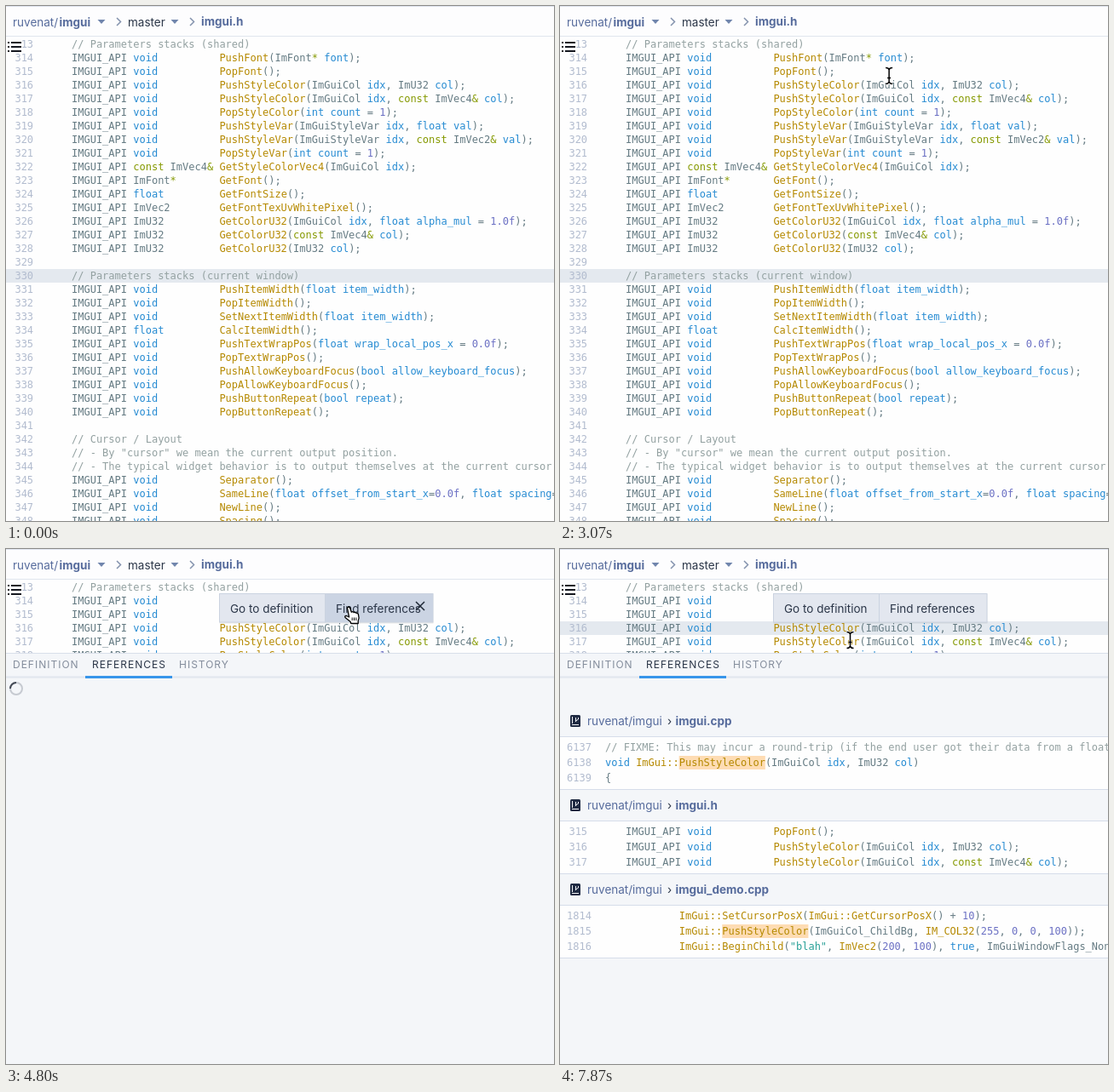
Animation, 643 px wide and 605 px high, one loop 8 s. Source, as an HTML page:

```html
<!DOCTYPE html>
<html lang="en">
<head>
<meta charset="utf-8">
<title>Find references</title>
<style>
html, body { margin: 0; width: 100%; height: 100%; overflow: hidden; background: #fefefe; }
svg { display: block; }
text { white-space: pre; font: 13.5px Inter, "Open Sans", sans-serif; }
.code { font: 12px "DejaVu Sans Mono", "Noto Sans Mono", monospace; fill: #657b83; }
.num { fill: #b2bccf; text-anchor: end; }
.comment { fill: #93a1a1; }
.string { fill: #2aa198; }
.number { fill: #6c71c4; }
.operator { fill: #859900; }
.call { fill: #b58900; }
.name { fill: #268bd2; }
.link { fill: #566b9c; }
.bold { font-weight: 700; }
.tab { font-size: 12px; letter-spacing: 1px; fill: #848d9c; }
.dark { fill: #2b3648; }
</style>
</head>
<body>
<svg id="stage" width="643" height="605" viewBox="0 0 643 605"></svg>
<script>
const LOOP = 8000;
const CHAR = 7.224;
const OWNER = 'ruvenat';
const stage = document.getElementById('stage');

const escapeText = s => s.replace(/&/g, '&amp;').replace(/</g, '&lt;');
const rect = (x, y, w, h, fill, extra = '') =>
  `<rect x="${x}" y="${y}" width="${w}" height="${h}" fill="${fill}" ${extra}/>`;
const path = (d, stroke, width, extra = '') =>
  `<path d="${d}" fill="none" stroke="${stroke}" stroke-width="${width}" ${extra}/>`;
const label = (x, y, cls, s) => `<text x="${x}" y="${y}" class="${cls}">${escapeText(s)}</text>`;

const kinds = ['comment', 'string', 'number', 'operator', 'call', 'name'];
const tokens = /(\/\/.*)|("[^"]*")|(\b\d[\d.]*f?\b)|(\bconst\b|[*&])|(ImGui::|\w+(?=\())|(\b[a-z]\w*)|\w+|[^\w*&"\/]+|./g;

function highlight(source) {
  return source.replace(tokens, (token, ...groups) => {
    const kind = kinds.find((_, i) => groups[i] !== undefined);
    const safe = escapeText(token);
    return kind ? `<tspan class="${kind}">${safe}</tspan>` : safe;
  });
}

// Line number plus highlighted source; wider numbers push the code right.
function codeLine(number, y, source) {
  const wide = number > 999;
  const indent = source.search(/\S|$/);
  const x = (wide ? 53 : 48.1) + indent * CHAR;
  return `<text x="${wide ? 37 : 32.1}" y="${y}" class="code num">${number}</text>` +
    `<text x="${x}" y="${y}" class="code">${highlight(source.slice(indent))}</text>`;
}

const api = (result, call) => `    IMGUI_API ${result.padEnd(14)}${call}`;

const listing = `// Parameters stacks (shared)
void|PushFont(ImFont* font);
void|PopFont();
void|PushStyleColor(ImGuiCol idx, ImU32 col);
void|PushStyleColor(ImGuiCol idx, const ImVec4& col);
void|PopStyleColor(int count = 1);
void|PushStyleVar(ImGuiStyleVar idx, float val);
void|PushStyleVar(ImGuiStyleVar idx, const ImVec2& val);
void|PopStyleVar(int count = 1);
const ImVec4&|GetStyleColorVec4(ImGuiCol idx);
ImFont*|GetFont();
float|GetFontSize();
ImVec2|GetFontTexUvWhitePixel();
ImU32|GetColorU32(ImGuiCol idx, float alpha_mul = 1.0f);
ImU32|GetColorU32(const ImVec4& col);
ImU32|GetColorU32(ImU32 col);

// Parameters stacks (current window)
void|PushItemWidth(float item_width);
void|PopItemWidth();
void|SetNextItemWidth(float item_width);
float|CalcItemWidth();
void|PushTextWrapPos(float wrap_local_pos_x = 0.0f);
void|PopTextWrapPos();
void|PushAllowKeyboardFocus(bool allow_keyboard_focus);
void|PopAllowKeyboardFocus();
void|PushButtonRepeat(bool repeat);
void|PopButtonRepeat();

// Cursor / Layout
// - By "cursor" we mean the current output position.
// - The typical widget behavior is to output themselves at the current cursor position.
void|Separator();
void|SameLine(float offset_from_start_x=0.0f, float spacing=-1.0f);
void|NewLine();
void|Spacing();`.split('\n').map(line =>
  line.includes('|') ? api(...line.split('|')) : '    ' + line);

const listingMarkup = listing.map((s, i) => codeLine(313 + i, 49 + 16 * i, s)).join('');

const caret = x => `<path d="M${x - 4.5} 16h9l-4.5 5z" fill="#7186ad"/>`;
const chevron = x => path(`M${x - 2} 14l4.5 4.5l-4.5 4.5`, '#8493ad', 1.5);

const header = rect(0, 0, 643, 35, '#fdfdfe') +
  rect(0, 0, 643, 1, '#dfe4ee') + rect(0, 35, 643, 1, '#e0e5ee') +
  label(8, 24, 'link', OWNER + '/') + label(62.5, 24, 'link bold', 'imgui') + caret(112) +
  chevron(132) + label(143, 24, 'dark', 'master') + caret(198) +
  chevron(218) + label(229, 23, 'link bold', 'imgui.h') +
  rect(0, 37, 18, 19, '#fefefe') +
  [43, 48, 53].map(y => rect(2, y - 1, 2, 2, '#14171f') + rect(6, y - 1, 12, 2, '#14171f')).join('');

const tabs = rect(0, 122, 643, 483, '#f4f6f9') + rect(0, 122, 643, 1, '#d9dfea') +
  rect(0, 149.5, 643, 2, '#e1e6ee') + rect(93, 149, 102, 3, '#3795ea') +
  label(8, 140, 'tab', 'DEFINITION') + label(101, 140, 'tab dark', 'REFERENCES') +
  label(203, 140, 'tab', 'HISTORY');

function resultBlock(top, file, first, sources) {
  const icon = rect(12, top - 25, 12, 14, '#1f2a42', 'rx="1.5"') +
    rect(14, top - 23, 1, 8, '#f4f6f9') +
    path(`M18.5 ${top - 22}v5M18.5 ${top - 18}l3 -2v-2M14 ${top - 13.5}h8`, '#f4f6f9', 1);
  return icon + label(32, top - 13, 'link', OWNER + '/imgui') +
    label(126, top - 13, 'dark', '›') + label(135.5, top - 13, 'link bold', file) +
    rect(0, top, 643, 63, '#fefefe') +
    rect(0, top, 643, 1, '#d6ddea') + rect(0, top + 62, 643, 1, '#d6ddea') +
    sources.map((s, i) => {
      const y = top + 17 + 18 * i;
      const at = s.indexOf('ImGui::PushStyleColor');
      const mark = at < 0 ? '' : rect(53 + (at + 7) * CHAR, y - 12, 14 * CHAR, 16, '#fedcb3');
      return mark + codeLine(first + i, y, s);
    }).join('');
}

const results =
  resultBlock(220, 'imgui.cpp', 6137, [
    '// FIXME: This may incur a round-trip (if the end user got their data from a float[4])',
    'void ImGui::PushStyleColor(ImGuiCol idx, ImU32 col)',
    '{']) +
  resultBlock(319, 'imgui.h', 315, listing.slice(2, 5)) +
  resultBlock(418, 'imgui_demo.cpp', 1814, [
    'ImGui::SetCursorPosX(ImGui::GetCursorPosX() + 10);',
    'ImGui::PushStyleColor(ImGuiCol_ChildBg, IM_COL32(255, 0, 0, 100));',
    'ImGui::BeginChild("blah", ImVec2(200, 100), true, ImGuiWindowFlags_None);'
  ].map(s => ' '.repeat(12) + s));

const beam = 'M-4 -9.5Q-.5 -9.5 0 -7Q.5 -9.5 4 -9.5M0 -7.5V7.5M-4 9.5Q-.5 9.5 0 7Q.5 9.5 4 9.5M-2 2.5H2';
const cursors = {
  arrow: '<path d="M0 0V16.5L3.8 13L6.4 19L9.2 17.8L6.7 12H11.5z" fill="#000" stroke="#fff" stroke-width="1"/>',
  beam: path(beam, '#fff', 3) + path(beam, '#000', 1.5),
  hand: '<path d="M-1.6 1.2Q-.2 -1 1.4 .8L3.4 6.2Q5 5 6.2 6.6Q7.9 5.6 8.8 7.3Q10.8 6.6 11.4 8.8' +
    'Q12.8 13 11.2 16.5L11.2 19.5H2.8L2.2 17.5L-4 12.5Q-5 10.3 -2.5 10.5L.6 12z" ' +
    'fill="#fff" stroke="#000" stroke-width="1.3" stroke-linejoin="round"/>' +
    path('M4.2 12.5V16M6.5 12.5V16M8.8 12.5V16', '#000', 1)
};

stage.innerHTML = `
  ${rect(0, 0, 643, 605, '#fefefe')}
  <rect id="row" width="643" height="16" fill="#e4e9ef"/>
  ${listingMarkup}${header}
  <g id="panel">${tabs}
    <g id="spinner"><circle r="7" fill="none" stroke="#c6cad1" stroke-width="2"/>
      ${path('M-7 0A7 7 0 0 1 0 -7', '#454b57', 2)}</g>
    <g id="results">${results}</g>
  </g>
  <g id="popup">
    ${rect(250.5, 53, 251, 34.5, '#000', 'opacity=".08"')}
    <rect id="goButton" x="250.5" y="52.5" width="124" height="33.5" stroke="#cbd3e0"/>
    <rect id="findButton" x="374.5" y="52.5" width="126.5" height="33.5"/>
    ${label(263, 75, 'dark', 'Go to definition')}${label(387, 75, 'dark', 'Find references')}
    <g id="close">${path('M481 62l10 10M491 62l-10 10', '#1f2937', 1.5)}</g>
  </g>
  <g id="cursor">${Object.entries(cursors).map(([k, m]) => `<g id="${k}">${m}</g>`).join('')}</g>`;

const el = id => document.getElementById(id);
const show = (id, on) => el(id).setAttribute('visibility', on ? 'inherit' : 'hidden');
const set = (id, name, value) => el(id).setAttribute(name, value);

// Pointer stops: time, x, y.
const stops = [
  [733, 652, 76], [800, 638, 80], [1000, 598, 90], [1200, 583, 100], [1600, 591, 105],
  [1667, 592, 106], [1900, 610, 113], [2130, 619, 104], [2270, 612, 97], [2400, 608, 106],
  [2467, 608, 109], [2533, 608, 109], [2800, 540, 100], [3000, 420, 84], [3130, 365, 81],
  [3400, 340, 92], [3933, 340, 92], [4200, 365, 80], [4467, 402, 68], [5900, 402, 68],
  [6330, 335, 340], [6600, 300, 498], [6733, 301, 484], [7000, 322, 317], [7330, 336, 160],
  [7600, 340, 113], [7733, 340.5, 107], [8000, 340.5, 107]
];

function slope(i, axis) {
  if (i < 1 || i > stops.length - 2) return 0;
  const rate = k => (stops[k + 1][axis] - stops[k][axis]) / (stops[k + 1][0] - stops[k][0]);
  const a = rate(i - 1), b = rate(i);
  return a * b > 0 ? 2 * a * b / (a + b) : 0;
}

// Monotone cubic through the stops, so holds stay still.
function pointerAt(t) {
  if (t < 760) return t > 260 && t < 330 ? [635, 543] : [700, 543];
  const i = Math.max(0, stops.findIndex(s => s[0] > t) - 1);
  const span = stops[i + 1][0] - stops[i][0];
  const u = (t - stops[i][0]) / span;
  return [1, 2].map(axis => {
    const p = stops[i][axis], q = stops[i + 1][axis];
    return p + (q - p) * u * u * (3 - 2 * u) +
      span * u * (1 - u) * (slope(i, axis) * (1 - u) - slope(i + 1, axis) * u);
  });
}

function pointerKind(t, x, y) {
  if (t < 3900) return x < 600 ? 'beam' : 'arrow';
  if (y > 480) return 'arrow';
  return y > 86 && y < 122 ? 'beam' : 'hand';
}

function render(time) {
  const t = Math.floor((time + 4) * 15 / 1000) * 1000 / 15;
  const [x, y] = pointerAt(t);
  const kind = pointerKind(t, x, y);
  set('cursor', 'transform', `translate(${x.toFixed(2)} ${y.toFixed(2)})`);
  Object.keys(cursors).forEach(k => show(k, k === kind));

  const opacity = t < 3460 ? 0 : t < 3530 ? 0.45 : t < 3595 ? 0.86 : t < 3660 ? 0.96 : 1;
  const hovering = t > 3900 && y < 86;
  const focused = t > 5990 && t < 7860;
  set('popup', 'opacity', opacity);
  set('goButton', 'fill', hovering && x < 374 ? '#cbd4e3' : '#e3e7ef');
  set('findButton', 'fill', hovering && x >= 374 ? '#cbd4e3' : '#e3e7ef');
  set('findButton', 'stroke', focused ? '#b8c3d4' : '#cbd3e0');
  show('close', t > 4790 && t < 5990);

  show('panel', t > 4790);
  show('spinner', t > 4790 && t < 4990);
  show('results', t > 4990);
  set('spinner', 'transform', `translate(12 164) rotate(${(t - 4800) * 0.6})`);
  set('row', 'y', t > 4860 ? 85 : 309);
}

const start = performance.now();
function tick() {
  render((performance.now() - start) % LOOP);
  requestAnimationFrame(tick);
}
tick();
</script>
</body>
</html>
```
